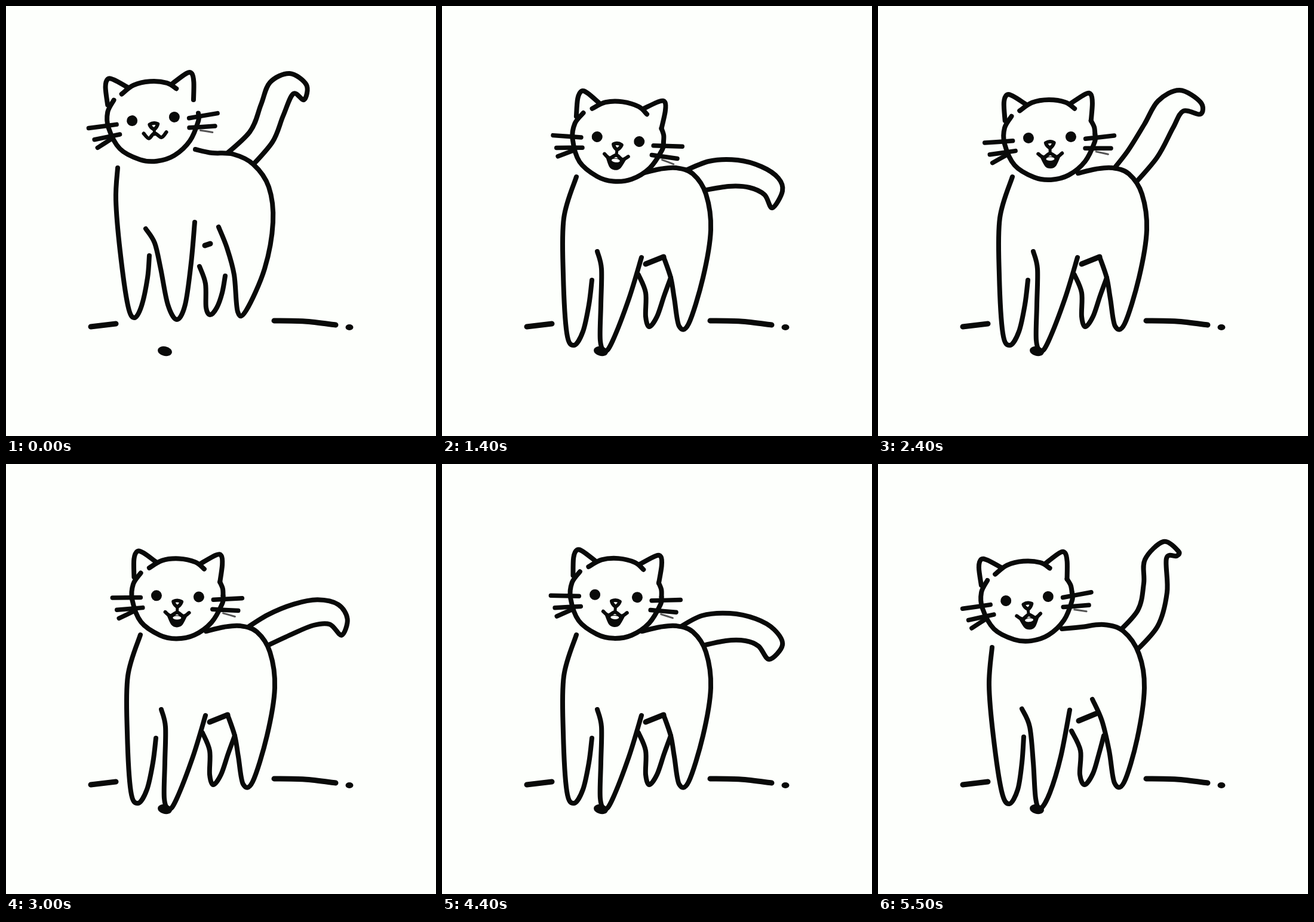
An HTML page with a canvas for the animation above (5600 ms loop, 720 by 720 pixels).

```html
<!DOCTYPE html>
<html lang="en">
<head>
<meta charset="utf-8">
<title>Cat wagging its tail</title>
<style>
  html, body { margin: 0; width: 100%; height: 100%; overflow: hidden; background: #fdfffc; }
  canvas { display: block; width: 100vw; height: 100vh; }
</style>
</head>
<body>
<canvas id="stage" width="720" height="720"></canvas>
<script>
const LOOP = 5600, STEP = 100;
const INK = '#090a09', PAPER = '#fdfffc';
const ctx = document.getElementById('stage').getContext('2d');

const points = text => text.trim().split(/\s+/).map(p => p.split(',').map(Number));
const mix = (a, b, k) => Array.isArray(a) ? a.map((v, i) => mix(v, b[i], k)) : a + (b - a) * k;

function sample(keys, t) {
  const i = keys.findIndex(([time]) => time > t);
  if (i < 0) return keys[keys.length - 1][1];
  const [t0, a] = keys[i - 1], [t1, b] = keys[i];
  return mix(a, b, (t - t0) / (t1 - t0));
}

// Body strokes: back with hind leg / front left leg / front right leg / far hind leg / belly.
const body = text => text.split('/').map(points);
const stand = body(`317,240 345,246 380,248 414,265 440,303 447,362 433,440 402,510 388,512 382,450 370,405 356,370
  / 187,271 184,325 191,410 204,501 215,522 227,502 237,455 240,418
  / 234,373 249,397 259,440 271,500 286,525 300,500 310,430 316,362
  / 324,436 334,465 335,505 342,517 353,505 362,480 367,452
  / 333,401 342,398`);
const stepping = body(`330,259 372,263 412,268 439,290 455,325 459,375 447,450 412,535 398,536 391,490 383,438 371,388
  / 202,286 193,345 197,430 209,535 221,555 235,532 245,480 248,444
  / 246,392 258,425 260,480 256,535 264,555 281,535 309,465 328,391
  / 324,435 336,458 340,505 346,525 358,508 370,470 379,435
  / 347,419 357,415`);
const front = body(`335,280 365,273 392,271 420,281 442,315 450,375 437,455 413,532 397,536 389,490 383,455 371,420
  / 225,286 204,355 203,450 209,548 221,568 236,545 246,500 251,459
  / 260,411 267,440 266,500 265,560 273,578 286,560 313,490 334,421
  / 329,450 341,480 341,520 347,537 360,520 372,485 383,455
  / 341,432 371,420`);
const turned = body(`308,276 340,273 378,269 411,280 437,318 446,375 434,460 412,533 396,534 387,480 375,430 359,394
  / 191,307 186,370 193,455 207,548 220,569 234,545 241,500 244,457
  / 241,410 254,440 260,500 264,560 272,577 288,550 306,490 321,412
  / 324,447 339,480 338,520 346,537 360,518 370,485 378,455
  / 336,430 365,418`);
const bodyKeys = [[0, stand], [150, stand], [800, stepping], [1300, front], [4700, front], [5450, turned]];

// Tail outlines are blended in polar form, so that the tail swings without shrinking.
const PIVOT = [350, 300];
const tail = text => points(text).map(([x, y]) => {
  const dx = x - PIVOT[0], dy = y - PIVOT[1];
  return [Math.hypot(dx, dy), Math.atan2(dy, dx)];
});
const fromPolar = ([r, a]) => [PIVOT[0] + r * Math.cos(a), PIVOT[1] + r * Math.sin(a)];

const high = tail('358,257 408,211 427,165 442,128 475,113 503,132 499,157 481,147 464,184 446,228 406,274');
const upright = tail('404,276 448,238 460,195 467,148 496,131 522,145 520,162 506,160 498,195 484,249 438,308');
const arched = tail('398,280 447,260 495,258 535,269 563,288 570,310 553,338 540,316 515,304 480,302 432,310');
const lean = tail('388,281 418,243 446,198 469,159 505,141 540,161 540,181 511,176 494,204 467,254 424,304');
const flat = tail('414,288 465,290 510,300 550,313 578,319 590,340 577,357 557,358 520,346 480,338 440,336');
const curled = tail('392,277 435,254 482,250 525,259 556,277 570,303 548,327 530,305 508,296 475,296 428,306');
const up = tail('398,286 435,245 445,200 447,160 478,130 503,146 500,154 483,158 484,215 468,272 426,319');
const down = tail('415,292 470,296 512,302 555,305 590,310 605,330 592,347 570,350 520,347 480,343 442,340');
const fall = tail('400,279 450,250 490,225 520,190 545,180 567,190 565,208 550,220 525,250 490,280 436,316');

const wag = (start, rise = arched) => [
  [start, down], [start + 120, flat], [start + 190, rise],
  [start + 430, lean], [start + 500, up], [start + 620, fall]
];
const tailKeys = [
  [0, high], [220, fall], [400, arched], [620, high], [800, upright], [1000, fall],
  ...wag(1210), ...wag(1970), ...wag(2730), ...wag(3480), ...wag(4210, curled), ...wag(5000)
];

// Head: midpoint between the eyes and tilt in degrees.
const headKeys = [
  [0, [246.5, 189, -5]], [800, [259.5, 204, -5]], [1400, [295, 223, 6.5]],
  [1800, [287, 220, -1.5]], [2150, [293, 222, 4]], [2400, [287.5, 220, -1.6]],
  [2550, [287, 220, -2]], [2900, [293, 222, 4]], [3260, [273, 220, -4]],
  [3600, [285.5, 219, 0]], [3750, [290, 221, 3]], [4050, [285, 220, -2]],
  [4400, [291.5, 221, 3.5]], [4800, [287, 220, -1]], [5400, [250, 225, -5.4]],
  [5500, [249.5, 225.5, -5.7]]
];
const mouthKeys = [[0, 0], [1000, 0], [1300, 1]];

const crown = points('-49,-46 -28,-59 0,-63 28,-58 43,-47');
const leftEar = points('-74,-30 -75,-60 -70,-73 -60,-71 -39,-57');
const rightEar = points('37,-56 62,-71 71,-70 73,-55 70,-26');
const face = points('-63,-37 -75,-18 -76,8 -60,45 -28,66 0,71 30,64 58,42 75,10 76,-3');
const cheek = points('76,-3 75,-15 70,-26');
const whiskers = ['-109,6 -62,4', '-101,26 -58,21', '-97,40 -72,27', '60,4 108,0', '59,20 102,21'].map(points);
const smileClosed = points('-18,23 -10,32 0,24 11,32 20,24');
const smileOpen = points('-20,27 -11,33 0,27 11,33 20,27');

// Smooth curve through every point.
function curve(p) {
  const path = new Path2D();
  path.moveTo(...p[0]);
  for (let i = 0; i < p.length - 1; i++) {
    const a = p[i - 1] || p[i], b = p[i], c = p[i + 1], d = p[i + 2] || c;
    path.bezierCurveTo(
      b[0] + (c[0] - a[0]) / 6, b[1] + (c[1] - a[1]) / 6,
      c[0] - (d[0] - b[0]) / 6, c[1] - (d[1] - b[1]) / 6, c[0], c[1]);
  }
  return path;
}

function stroke(p, width = 8, color = INK) {
  ctx.lineWidth = width;
  ctx.strokeStyle = color;
  ctx.stroke(curve(p));
}

function ellipse(x, y, rx, ry = rx, angle = 0, color = INK) {
  ctx.fillStyle = color;
  ctx.beginPath();
  ctx.ellipse(x, y, rx, ry, angle, 0, Math.PI * 2);
  ctx.fill();
}

function drawGround() {
  stroke(points('142,537 184,532'), 9);
  stroke(points('449,527 500,528 552,534'), 9);
  ellipse(575, 538, 6.5, 5);
  ellipse(266, 578, 12, 8, 0.2);
}

function drawBody(strokes) {
  ctx.fillStyle = PAPER;
  ctx.fill(curve(strokes[0]));
  strokes.forEach((p, i) => stroke(p, i === 4 ? 9 : 8));
}

function drawMouth(open) {
  if (open > 0) {
    const depth = 33 + 16 * open;
    const jaw = curve([[-14, 32], [-7, depth - 3], [0, depth], [7, depth - 3], [14, 32]]);
    ctx.fillStyle = INK;
    ctx.fill(jaw);
    ctx.lineWidth = 6;
    ctx.stroke(jaw);
    ellipse(0, 36, 7 * open, 3 * open, 0, PAPER);
  }
  stroke(mix(smileClosed, smileOpen, open), 6);
  stroke([[0, 18], [0, 26]], 5);
  ctx.lineWidth = 6;
  ctx.stroke(new Path2D('M-7 9 Q0 5 7 9 Q5 15 0 18 Q-6 14 -7 9Z'));
}

function drawHead([x, y, tilt], open) {
  ctx.save();
  ctx.translate(x, y);
  ctx.rotate(tilt * Math.PI / 180);
  ellipse(0, 4, 75, 66, 0, PAPER);
  [crown, leftEar, rightEar, face].forEach(p => stroke(p));
  if (open > 0) stroke(cheek);
  stroke(points('77,26 97,31'), 3, '#555');
  whiskers.forEach(p => stroke(p, 7.5));
  ellipse(-35.5, 0, 9);
  ellipse(35.5, 0, 9);
  drawMouth(open);
  ctx.restore();
}

function draw(t) {
  ctx.fillStyle = PAPER;
  ctx.fillRect(0, 0, 720, 720);
  ctx.lineCap = ctx.lineJoin = 'round';
  drawGround();
  stroke(sample(tailKeys, t).map(fromPolar));
  drawBody(sample(bodyKeys, t));
  drawHead(sample(headKeys, t), sample(mouthKeys, t));
}

function tick() {
  const t = performance.now() % LOOP;
  draw(Math.floor(t / STEP) * STEP);
  requestAnimationFrame(tick);
}
tick();
</script>
</body>
</html>
```
